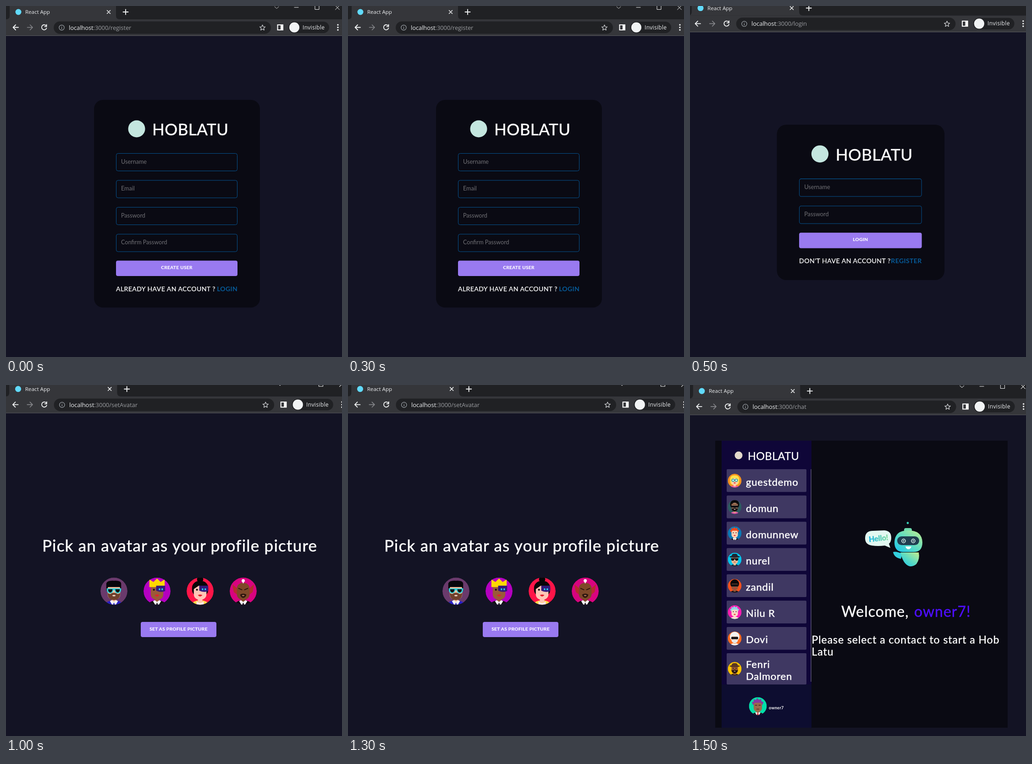
Animation, 733 px wide and 763 px high, one loop 2 s. Source, as an HTML page:

```html
<!DOCTYPE html>
<html lang="en">
<head>
<meta charset="utf-8">
<title>Chat app tour</title>
<style>
  html, body { margin: 0; width: 100%; height: 100%; overflow: hidden; background: #131324; }
  svg { display: block; width: 733px; height: 763px; }
  text { font-family: Lato, sans-serif; white-space: pre; }
  .ui { font-family: "Open Sans", "Noto Sans", sans-serif; }
  .line { fill: none; stroke-linecap: round; stroke-linejoin: round; }
  .scene { opacity: 0; animation: show 2s step-end infinite; }
  @keyframes show { 0% { opacity: 1; } 25%, 100% { opacity: 0; } }
</style>
</head>
<body>
<svg id="stage" viewBox="0 0 733 763">
  <defs>
    <clipPath id="disc"><circle r="30"/></clipPath>
    <linearGradient id="mint" x1="0" y1="1" x2="1" y2="0">
      <stop offset="0" stop-color="#18c4ee"/><stop offset=".5" stop-color="#5fdcc0"/><stop offset="1" stop-color="#c6ef8e"/>
    </linearGradient>
    <linearGradient id="hello">
      <stop offset="0" stop-color="#16b4e4"/><stop offset="1" stop-color="#7fdc9c"/>
    </linearGradient>
  </defs>
</svg>
<script>
const BG = '#131324', PANEL = '#0a0a13', VIOLET = '#997af0', BLUE = '#04528f', BRAND = 'HOBLATU';

const rect = (x, y, w, h, fill, r = 0, more = '') =>
  `<rect x="${x}" y="${y}" width="${w}" height="${h}" rx="${r}" fill="${fill}" ${more}/>`;
const circle = (x, y, r, fill, more = '') => `<circle cx="${x}" cy="${y}" r="${r}" fill="${fill}" ${more}/>`;
const oval = (x, y, rx, ry, fill) => `<ellipse cx="${x}" cy="${y}" rx="${rx}" ry="${ry}" fill="${fill}"/>`;
const shape = (d, fill) => `<path d="${d}" fill="${fill}"/>`;
const line = (d, color, w = 1.5) => `<path class="line" d="${d}" stroke="${color}" stroke-width="${w}"/>`;
const group = (transform, body) => `<g transform="${transform}">${body}</g>`;
const text = (x, y, size, str, { fill = '#fff', gap = 0, bold = 0, thick = 0, anchor = 'start', cls = '' } = {}) =>
  `<text class="${cls}" x="${x}" y="${y}" font-size="${size}" fill="${fill}" letter-spacing="${gap}"
    font-weight="${bold ? 700 : 400}" text-anchor="${anchor}" stroke="${fill}" stroke-width="${thick}">${str}</text>`;

/* Browser frame */
function browser(path) {
  const white = '#f1f3f4', grey = '#85868a';
  return rect(-20, -20, 800, 49, '#202124') + rect(-20, 29, 800, 35.5, '#35363a') +
    rect(-20, 64, 800, 1, '#5b5c60') +
    shape('M0 29Q8 29 8 21V-20H240V21Q240 29 248 29Z', '#35363a') +
    circle(27, 13, 6.5, '#61dafb') +
    text(42, 17, 11.5, 'React App', { fill: '#eceef0', cls: 'ui' }) +
    line('M220.5 9.5l7 7m0-7l-7 7', white) + line('M255.5 13h11m-5.5-5.5v11', white, 1.9) +
    line('M586 1.5l4.5 4 4.5-4', '#c9cacc', 1) + line('M629 3h9', white, 1) +
    line('M674 -2v9.5h9V-2', white, 1) + line('M718.5 -1l9 9m0-9l-9 9', white, 1) +
    line('M27 46.5H15.5m5.5-5.5l-5.5 5.5 5.5 5.5', white, 1.8) +
    line('M46.500 46.5H58m-5.500-5.5l5.500 5.500-5.500 5.500', grey, 1.6) +
    line('M87.700 43A5.500 5.500 0 1 0 88.500 48M88.500 40.500v4.200h-4.200', white, 1.8) +
    rect(104, 33.5, 474, 27, '#202124', 13.5) +
    circle(121.5, 47, 5.6, 'none', 'stroke="#9aa0a6" stroke-width="1.2"') + line('M121.5 46.5v3m0-5.500v.1', '#9aa0a6', 1.3) +
    text(137, 51.5, 13, `localhost<tspan fill="#989a9e" stroke="none">:3000/${path}</tspan>`, { fill: '#eceef0', gap: -.1, cls: 'ui' }) +
    line('M559.500 41l1.700 4 4.300.4-3.300 2.800 1 4.300-3.700-2.300-3.700 2.300 1-4.300-3.300-2.800 4.300-.4z', '#d2d4d7', 1.2) +
    rect(592.5, 41, 11.5, 11, 'none', 0, 'stroke="#fff" stroke-width="2"') + rect(599, 41, 5, 11, '#fff') +
    rect(616, 34, 89, 25, '#202124', 12.5) + circle(629, 46.5, 11, '#f1f3f4') +
    text(647, 50.5, 12, 'Invisible', { fill: '#eceef0', gap: .3, cls: 'ui' }) +
    [41, 46.5, 52].map(y => circle(724, y, 1.7, white)).join('');
}

/* Sign-up and sign-in cards */
function button(x, y, w, h, label) {
  return rect(x, y, w, h, VIOLET, 4) +
    text(x + w / 2, y + 18.5, 10, label, { bold: 1, gap: .4, thick: .2, anchor: 'middle' });
}

function card(top, fields, label, question, link) {
  const first = top + 116, step = 58.5, end = first + fields.length * step;
  return rect(192, top, 362, end + 101.5 - top, PANEL, 20) +
    circle(285, top + 63, 18.5, '#c4e6df') +
    text(319, top + 77, 35, BRAND, { gap: .5, thick: .5 }) +
    fields.map((name, i) => {
      const y = first + i * step;
      return rect(240.5, y + .5, 264, 38, 'none', 4, `stroke="${BLUE}"`) +
        text(251, y + 22.5, 12.6, name, { fill: '#707075' });
    }).join('') +
    button(240, end - .5, 265, 33.5, label) +
    text(240, end + 65.5, 14, question, { gap: .45, thick: .25 }) +
    text(505, end + 65.5, 14, link, { fill: '#065a98', gap: .3, bold: 1, anchor: 'end' });
}

/* Avatars, drawn on a disc of radius 30 */
function avatar(x, y, r, bg, skin, shirt, back, front) {
  return group(`translate(${x} ${y}) scale(${r / 30})`, `<g clip-path="url(#disc)">` +
    circle(0, 0, 30, bg) + back + shape('M-20 32Q-18 21 0 20Q18 21 20 32Z', shirt) +
    rect(-5, 12, 10, 13, skin) + rect(-14, -18, 28, 37, skin, 12) + front + '</g>');
}
const eyes = circle(-6, -2, 2, '#17131c') + circle(6, -2, 2, '#17131c');
const lips = shape('M-5 9Q0 6 5 9Q0 15-5 9Z', '#e3202c');
const collar = shape('M-9 22L-3 32 0 25 3 32 9 22 5 20 0 24-5 20Z', '#f4f4f6');
const shades = (lens, rim = lens) =>
  shape('M-16-6H16V-2Q15 5 8 5 3 5 1-2H-1Q-3 5-8 5-15 5-16-2Z', rim) +
  shape('M-13-4H-3Q-4 3-8 3-13 3-13-4ZM3-4H13Q13 3 8 3 4 3 3-4Z', lens);
const beard = color => shape('M-14 4Q-8 8-6 5 0 2 6 5 8 8 14 4 14 19 0 20-14 19-14 4Z', color) + oval(0, 10, 3.5, 1.6, '#f0d6c6');
const visor = shape('M-2-12H18V0Q8 4-2-1Z', '#33187a') + rect(4, -6, 3, 4, '#20d6f4') + rect(10, -6, 3, 4, '#20d6f4') + circle(-7, -3, 2.2, '#111');
const hat = color => oval(0, -12, 23, 4.5, color) + shape('M-14-12Q-14-27 0-25 14-27 14-12Z', color);
const flatTop = color => shape('M-17 0V-17Q-15-24 0-23 15-24 16-17V0L13-9H-13Z', color);
const spikes = color => shape('M-16-3L-20-13-14-15-14-23-7-20-2-27 3-21 11-24 12-16 19-13 15-3 11-11-10-11Z', color);

const choices = [
  ['#6a3a6c', '#f6c3a0', '#2920c8', '', flatTop('#07060a') + beard('#70402c') + shades('#111', '#2fd0d8') + collar],
  ['#b400c0', '#9b5a38', '#111', '', shape('M-17-9V-26L-8-20 0-28 8-20 17-26V-9Z', '#ffd900') + visor + lips + collar],
  ['#ff1548', '#ffc5b6', '#ffd84a', circle(0, -26, 7, '#080608') + rect(-18, -22, 36, 34, '#080608', 15),
    shape('M-16-3Q-17-22 0-22 17-22 16-8L-3-12Z', '#080608') + visor + lips + shape('M-8 22Q0 30 8 22V32H-8Z', '#f8e6ee')],
  ['#d8047f', '#7e4828', '#0c0a10', shape('M-11-4L-24-15-21 2-11 10ZM11-4L24-15 21 2 11 10Z', '#b72c2e'),
    line('M0-18v-5', '#fff', 2) + circle(0, -23, 3.5, '#fff') + line('M-10-6l7 3m13-3l-7 3', '#2a140d', 2) +
    shape('M-7 8Q0 3 7 8 5 15 0 15-5 15-7 8Z', '#2a140d') + oval(0, 10, 3, 1.5, '#a56b4c') + collar],
];

const shadeBar = rect(-15, -7, 30, 10, '#101014', 3);
const contacts = [
  ['guestdemo', '#f7931e', '#ffd0a8', '#f0569a', rect(-20, -23, 40, 42, '#ffe04a', 16),
    shape('M-15-4Q-14-22 0-22 14-22 15-4L0-13Z', '#ffe04a') +
    [-7, 7].map(x => circle(x, -2, 5.5, '#d7f6f4', 'stroke="#168f98" stroke-width="2.500"')).join('') + lips],
  ['domun', '#2c5b60', '#d9a57f', '#e456a8', circle(0, -11, 20, '#0b090b'), rect(-15, -14, 30, 4, '#5a3426') + shadeBar + beard('#191114')],
  ['domunnew', '#0a79b6', '#ffd2b4', '#171822', '', spikes('#f24a1c') + eyes + lips + collar],
  ['nurel', '#04c6ee', '#f0bd98', '#1b2a3c', '', hat('#1d2633') + shades('#101014') + line('M-4 11h8', '#7a3b2d', 2)],
  ['zandil', '#f4511e', '#94583a', '#171822', circle(0, -9, 19, '#0b090b'), flatTop('#0b090b') + shadeBar + lips],
  ['Nilu R', '#ff1cb2', '#ffd7c8', '#f5f0dc', '', spikes('#8fd8e6') + eyes + lips],
  ['Dovi', '#ff6c20', '#f3c4a4', '#fafafa', circle(0, -8, 21, '#f2f2f2'), flatTop('#f2f2f2') + beard('#e8e8e8') + shadeBar],
  ['Fenri', '#ffc400', '#99592f', '#3a2a20', '', hat('#5b3620') + eyes + beard('#2a1710')],
];

/* Chat page */
function contact([name, bg, skin, shirt, back, front], i, all) {
  const y = 183 + i * 57.15, last = i === all.length - 1, opt = { gap: .8, thick: .5 };
  return rect(80, y, 174, last ? 68 : 49.5, '#3f3862', 2) +
    avatar(97.5, y + (last ? 34 : 25), 15, bg, skin, shirt, back, front) +
    text(122, y + (last ? 32 : 35.5), 22, name, opt) + (last ? text(122, y + 58, 22, 'Dalmoren', opt) : '');
}

const robot =
  shape('M382 333Q382 317 399 317L424 316Q439 317 439 332 439 341 434 345L437 354 425 349Q410 351 397 349 382 347 382 333Z', '#e2f8f1') +
  group('rotate(-6 411 333)', text(390, 339, 16, 'Hello!', { fill: 'url(#hello)', bold: 1, thick: .6 })) +
  circle(475, 300, 2.4, '#36cbb2') + rect(467, 311, 17, 10, '#6fdcae', 4) +
  shape('M443 363Q451 361 463 367L460 378Q445 375 443 363Z', '#33d0de') +
  shape('M459 364H499Q502 378 494 389 488 395 479 394 465 390 459 364Z', 'url(#mint)') +
  shape('M446 342Q447 316 476 316 506 316 507 342 507 363 488 363H464Q446 362 446 342Z', 'url(#mint)') +
  rect(452, 329, 48, 19, '#203e50', 9.5) +
  [466, 487].map(x => circle(x, 339, 4, '#203e50', 'stroke="#e8fffa" stroke-width="1.500"') + circle(x, 339, 1.4, '#e8fffa')).join('') +
  shape('M470 351H483Q481 357 476.500 357 472 357 470 351Z', '#f4fffc');

const chat =
  rect(55, 121, 638, 624, PANEL) + rect(69, 121, 196, 531, '#0f0638') + rect(69, 651, 196, 94, '#0d0d30') +
  circle(106, 153, 8.5, '#e2d9cb') + text(126, 163, 23.5, BRAND, { gap: .4, thick: .4 }) +
  contacts.map(contact).join('') + rect(263, 183, 2, 462, '#45405f') +
  avatar(148, 698, 19.5, '#02dfa8', '#9a6a4c', '#191822', '',
    spikes('#87399f') + line('M-9-3h6m6 0h6', '#2a1b1b', 2) + line('M-4 10h8', '#5c2f25', 2) + collar + shape('M-2 24H2L3 32H-3Z', '#d92332')) +
  text(172, 705, 9, 'owner7', { bold: 1, gap: .3 }) + robot +
  text(330, 504, 32, 'Welcome,', { gap: 1, thick: .4 }) +
  text(489, 504, 32, 'owner7!', { fill: '#4e0eff', gap: 1, thick: .4 }) +
  text(265.5, 562, 23, 'Please select a contact to start a Hob', { gap: .95, thick: .4 }) +
  text(265.5, 588, 23, 'Latu', { gap: .95, thick: .4 });

const picker =
  text(79, 362, 35, 'Pick an avatar as your profile picture', { gap: 1.2, thick: .5 }) +
  choices.map((look, i) => avatar(235.5 + 94 * i, 448, 29.5, ...look)).join('') +
  button(294, 515, 165, 33, 'SET AS PROFILE PICTURE');

/* Each screen has its own slight zoom and offset */
const zoomLogin = 'translate(-4.3 -8.6) scale(1.0098)';
const scenes = [
  browser('register') + card(204, ['Username', 'Email', 'Password', 'Confirm Password'],
    'CREATE USER', 'ALREADY HAVE AN ACCOUNT ?', 'LOGIN'),
  group(zoomLogin, browser('login') + card(264, ['Username', 'Password'],
    'LOGIN', "DON'T HAVE AN ACCOUNT ?", 'REGISTER')),
  group('translate(-.9 -4.5) scale(1.0137)', browser('setAvatar')) + picker,
  group('translate(-1.4 0) scale(1.007)', browser('chat')) + chat,
];

document.getElementById('stage').insertAdjacentHTML('beforeend', scenes.map((body, i) =>
  `<g class="scene" style="animation-delay:${i * 500 - 2000}ms">${rect(0, 0, 733, 763, BG)}${body}</g>`).join(''));
</script>
</body>
</html>
```
